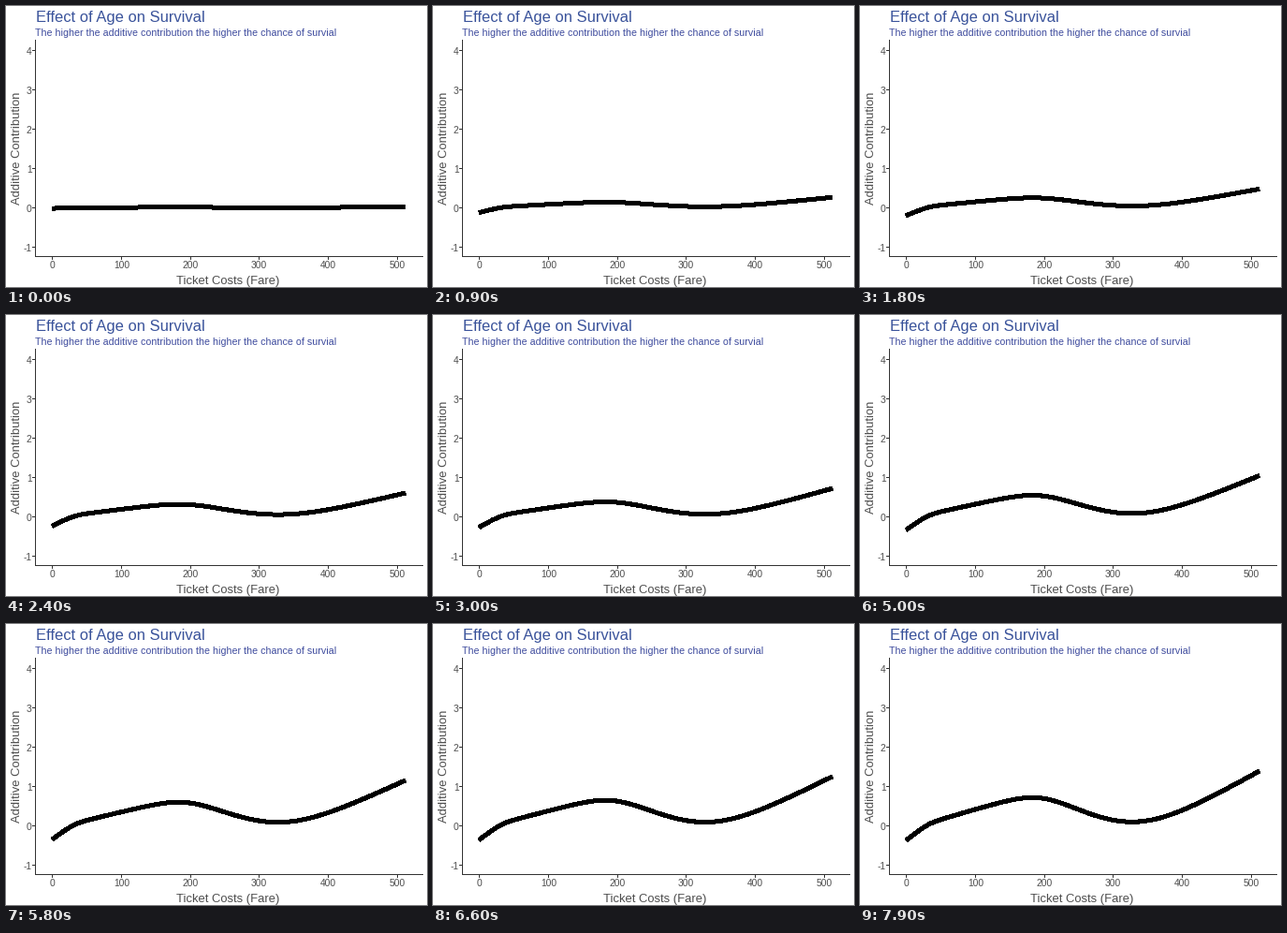
Animation of 450x300 px, one loop 8000 ms. Source, as a matplotlib script:

```python
import numpy as np
import matplotlib.pyplot as plt
from matplotlib.animation import FuncAnimation

W, H, DPI = 450, 300, 100
FRAMES, INTERVAL = 80, 100
PX = 72 / DPI  # points per pixel

LEFT, RIGHT = 49.3, 426.8  # ends of the curve
ZERO, UNIT = 215.5, 42     # height of level 0, pixels per level
GREY, DARK = "#4d4d4d", "#333333"

plt.rcParams["font.family"] = "Liberation Sans"
plt.rcParams["path.snap"] = False

fig = plt.figure(figsize=(W / DPI, H / DPI), dpi=DPI, facecolor="white")
ax = fig.add_axes([0, 0, 1, 1])
ax.set_xlim(0, W)
ax.set_ylim(H, 0)
ax.axis("off")


def text(x, y, s, size, color=GREY, ha="center", **kw):
    ax.text(x, y, s, fontsize=size * PX, color=color, ha=ha, va="baseline", **kw)


def rule(xs, ys):
    ax.plot(xs, ys, color=DARK, lw=PX, solid_capstyle="butt")


def growth(n, rate):
    """Exponential approach that reaches 1 at the end of the loop."""
    return (1 - np.exp(-rate * (n + 1))) / (1 - np.exp(-rate * FRAMES))


def bend(x, at, width):
    """Smooth hinge: flat before `at`, slope 1 after it."""
    return width * np.logaddexp(0, (x - at) / width)


def contribution(x, n):
    """Curve height in pixels: a steep start, a hump, a dip and a rise."""
    fast, slow = growth(n, 0.037), growth(n, 0.0125)
    start = fast * (0.78 * (x - LEFT) - 15.5)
    knee = (0.29 * slow - 0.78 * fast) * bend(x, 73, 5)
    hump = -0.84 * slow * bend(x, 191.7, 14.5)
    rise = 1.105 * slow * bend(x, 291, 28)
    return start + knee + hump + rise


rule([31.5, 31.5], [36, 268])
rule([31, 446], [267.5, 267.5])

for fare in range(0, 501, 100):
    x = 49.5 + round(0.7375 * fare)
    rule([x, x], [268, 271])
    text(x, 280.5, str(fare), 10.3)

for level in range(-1, 5):
    y = ZERO - UNIT * level
    rule([28, 31], [y, y])
    text(27.5, y + 4, str(level), 10.3, ha="right")

text(31.5, 17, "Effect of Age on Survival", 16.5, "#3a539b", "left")
text(31, 32, "The higher the additive contribution the higher the chance of survial",
     10.57, "#3f4c9e", "left")
text(237.5, 297, "Ticket Costs (Fare)", 13)
text(15.5, 151.5, "Additive Contribution", 13, rotation=90, rotation_mode="anchor")

xs = np.linspace(LEFT, RIGHT, 120)
curve, = ax.plot([], [], color="black", lw=4 * PX, antialiased=False,
                 solid_capstyle="butt", solid_joinstyle="round")


def draw(n):
    curve.set_data(xs, ZERO - contribution(xs, n))
    return curve,


anim = FuncAnimation(fig, draw, frames=FRAMES, interval=INTERVAL,
                     repeat=True, repeat_delay=0, blit=False)
plt.show()
```
